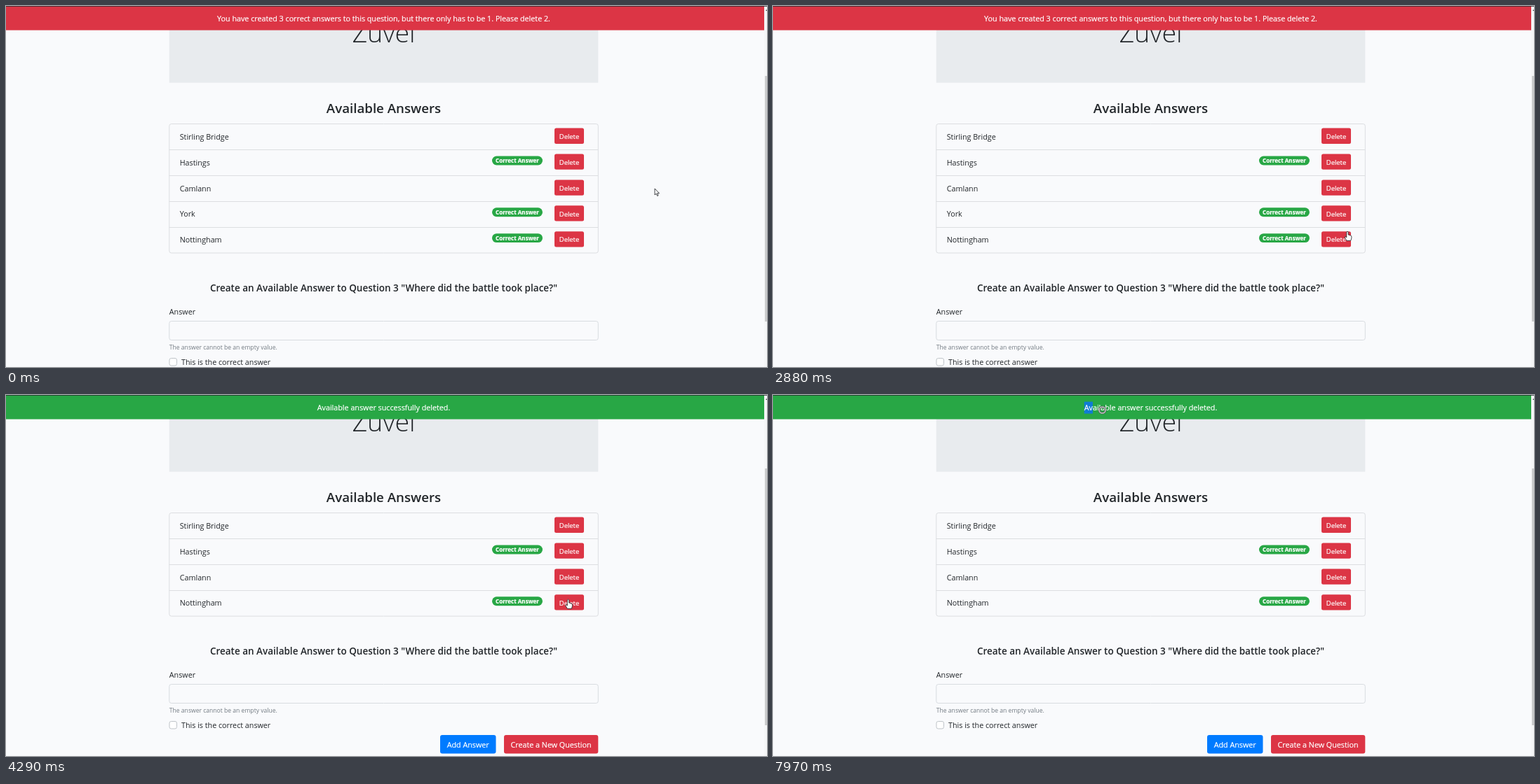
An HTML page with a canvas for the animation above (8000 ms loop, 1085 by 516 pixels).

```html
<!DOCTYPE html>
<html lang="en">
<head>
<meta charset="utf-8">
<title>Available Answers</title>
<style>
  html, body { margin: 0; width: 100%; height: 100%; overflow: hidden; background: #f9fafc; }
  canvas { display: block; }
</style>
</head>
<body>
<canvas id="stage" width="1085" height="516"></canvas>
<script>
const ctx = document.getElementById('stage').getContext('2d');
const LOOP = 8000, DELETED = 4290;
const LEFT = 232.5, WIDTH = 611.5, MID = 538.5, ROW = 36.9, LIST_TOP = 168.5;
const PAGE = '#f9fafc', INK = '#212529', RED = '#dc3545', GREEN = '#28a745', BLUE = '#007bff';
const BODY = 10.74;

const answers = [
  { name: 'Stirling Bridge' },
  { name: 'Hastings', correct: true },
  { name: 'Camlann' },
  { name: 'York', correct: true },
  { name: 'Nottingham', correct: true }
];

// time, x, y of the pointer's hot spot
const path = [
  [0, 925, 261], [1700, 925, 261], [1900, 925, 272], [2150, 920, 294], [2310, 905, 312],
  [2510, 874, 323], [2700, 843, 325], [2880, 819, 322], [3080, 808, 306], [3310, 801.5, 292],
  [6570, 801.5, 292], [6660, 553, 160], [6860, 505, 92], [7120, 465, 42], [7340, 453, 24],
  [7520, 449, 18], [7660, 446, 16], [7820, 445, 16], [7970, 469.5, 21.5], [LOOP, 469.5, 21.5]
];

const arrow = new Path2D('M0 0V9L2.1 7.2L3.6 10.5L5 9.9L3.6 6.7H6.4Z');
const hand = new Path2D('M-1.2 1Q0 -.6 1.2 1V5L4.5 6Q6 6.3 5.9 8V10L4.8 13.5H-1L-3.8 9Q-4 7.6 -2.8 7.8L-1.2 9Z');
const beam = new Path2D('M-2 -5.5H2M-2 5.5H2M0 -5.5V5.5');

const clamp = v => Math.max(0, Math.min(1, v));
const ramp = (t, start, span = 150) => clamp((t - start) / span);

function pointerAt(t) {
  const i = Math.max(1, path.findIndex(p => p[0] > t));
  const [t0, x0, y0] = path[i - 1], [t1, x1, y1] = path[i];
  const k = (t - t0) / (t1 - t0);
  return [x0 + (x1 - x0) * k, y0 + (y1 - y0) * k];
}

function setFont(size, weight = 400) {
  ctx.font = `${weight} ${size}px "Open Sans", "Noto Sans", sans-serif`;
}

function text(str, x, y, size = BODY, color = INK, align = 'left', weight = 400) {
  setFont(size, weight);
  ctx.fillStyle = color;
  ctx.textAlign = align;
  ctx.fillText(str, x, y);
}

// White text gets a hairline outline so that it stays crisp on colour.
function whiteText(str, x, y, size = BODY, weight = 400) {
  text(str, x, y, size, '#fff', 'center', weight);
  ctx.strokeStyle = '#fff';
  ctx.lineWidth = 0.2;
  ctx.strokeText(str, x, y);
}

function rect(x, y, w, h, color) {
  ctx.fillStyle = color;
  ctx.fillRect(x, y, w, h);
}

function box(x, y, w, h, r, fill, stroke) {
  ctx.beginPath();
  ctx.roundRect(x, y, w, h, r);
  if (fill) { ctx.fillStyle = fill; ctx.fill(); }
  if (stroke) { ctx.strokeStyle = stroke; ctx.lineWidth = 1; ctx.stroke(); }
}

function shade(hover, press) {
  const mix = (a, b, c) => Math.round(a + (b - a) * hover + (c - b) * press);
  return `rgb(${mix(220, 200, 189)},${mix(53, 35, 33)},${mix(69, 51, 48)})`;
}

function deleteButton(y, hover, press) {
  if (press) box(780.4, y - 1.6, 45.2, 25.4, 4, `rgba(220,53,69,${0.4 * press})`);
  box(782, y, 42, 22.3, 2.5, shade(hover, press));
  whiteText('Delete', 803, y + 15.2, BODY * 0.875);
}

function hoverOf(name, t) {
  if (name === 'York') return ramp(t, 3120);
  if (name !== 'Nottingham') return 0;
  if (t < DELETED) return ramp(t, 2880) * (1 - ramp(t, 3110));
  return ramp(t, DELETED, 40) * (1 - ramp(t, 6620));
}

function drawList(rows, t) {
  const line = '#dcdee1';
  box(LEFT + 0.3, LIST_TOP, WIDTH, ROW * rows.length, 3, null, line);
  rows.forEach(({ name, correct }, i) => {
    const y = LIST_TOP + ROW * i;
    if (i) rect(LEFT, Math.floor(y), WIDTH, 1, line);
    text(name, 247.7, y + 22.2);
    if (correct) {
      box(693, y + 9.1, 72, 12.9, 6.45, GREEN);
      whiteText('Correct Answer', 729, y + 18.4, BODY * 0.75, 700);
    }
    deleteButton(y + 6.1, hoverOf(name, t), name === 'York' ? ramp(t, 4030) : 0);
  });
}

function drawForm(y) {
  text('Create an Available Answer to Question 3 "Where did the battle took place?"',
    MID, y + 54.5, 13.5, INK, 'center', 600);
  text('Answer', 232.8, y + 88);
  box(LEFT + 0.3, y + 97.5, WIDTH, 27, 3, null, '#d8dce0');
  text('The answer cannot be an empty value.', 232.8, y + 138.3, BODY * 0.8, '#737b83');
  box(233, y + 150.5, 10.5, 10.5, 2.5, '#fff', '#bfc4c9');
  text('This is the correct answer', 250, y + 160.3);
  box(619, y + 170, 79.5, 26.5, 3, BLUE);
  whiteText('Add Answer', 658.7, y + 188);
  box(710, y + 170, 134.3, 26.5, 3, RED);
  whiteText('Create a New Question', 777, y + 188);
}

function drawBanner(done, t) {
  rect(0, 0, 1081, 34.6, done ? GREEN : RED);
  rect(0, 0, 1085, 1, 'rgba(35,38,43,0.75)');
  const message = done
    ? 'Available answer successfully deleted.'
    : 'You have created 3 correct answers to this question, but there only has to be 1. Please delete 2.';
  if (t >= 7920) {
    setFont(BODY);
    const start = MID - ctx.measureText(message).width / 2;
    rect(start, 9.6, ctx.measureText('Av').width, 17, '#0f7cd6');
  }
  whiteText(message, MID, 22.2);
}

function drawScrollbar(top, bottom) {
  rect(1081, 1, 4, 515, '#f5f6f7');
  rect(1082, top, 3, bottom - top, '#cbcccd');
  rect(1083.5, 5.5, 1.5, 1.5, '#505050');
}

function drawPointer(t) {
  const [x, y] = pointerAt(t);
  ctx.save();
  ctx.translate(x, y);
  ctx.lineJoin = 'round';
  if (t >= 7820) {
    for (const [color, width] of [['#4f5a55', 3], ['#c3cbc7', 1.5]]) {
      ctx.beginPath();
      ctx.arc(0, 0, 4.5, 0, Math.PI * 2);
      ctx.strokeStyle = color;
      ctx.lineWidth = width;
      ctx.stroke();
    }
  } else if (t >= 7300) {
    ctx.strokeStyle = '#1c1c1c';
    ctx.lineWidth = 0.9;
    ctx.stroke(beam);
  } else {
    const shape = x < 825 && x > 782 && t > 2800 ? hand : arrow;
    ctx.fillStyle = '#fff';
    ctx.strokeStyle = '#25282c';
    ctx.lineWidth = 0.85;
    ctx.fill(shape);
    ctx.stroke(shape);
  }
  ctx.restore();
}

function draw(t) {
  const done = t >= DELETED;
  const rows = done ? answers.filter(a => a.name !== 'York') : answers;
  rect(0, 0, 1085, 516, PAGE);
  rect(232.7, 34, 611.6, 75.7, '#e8ebee');
  text('Zuvel', MID, 52, 37.6, INK, 'center', 300);
  text('Available Answers', MID, 152.6, 18.7, INK, 'center', 600);
  drawList(rows, t);
  drawForm(done ? 316 : 353);
  drawBanner(done, t);
  drawScrollbar(done ? 105 : 100, done ? 472 : 451);
  drawPointer(t);
}

const began = performance.now();
function tick() {
  draw((performance.now() - began) % LOOP);
  requestAnimationFrame(tick);
}
tick();
</script>
</body>
</html>
```
